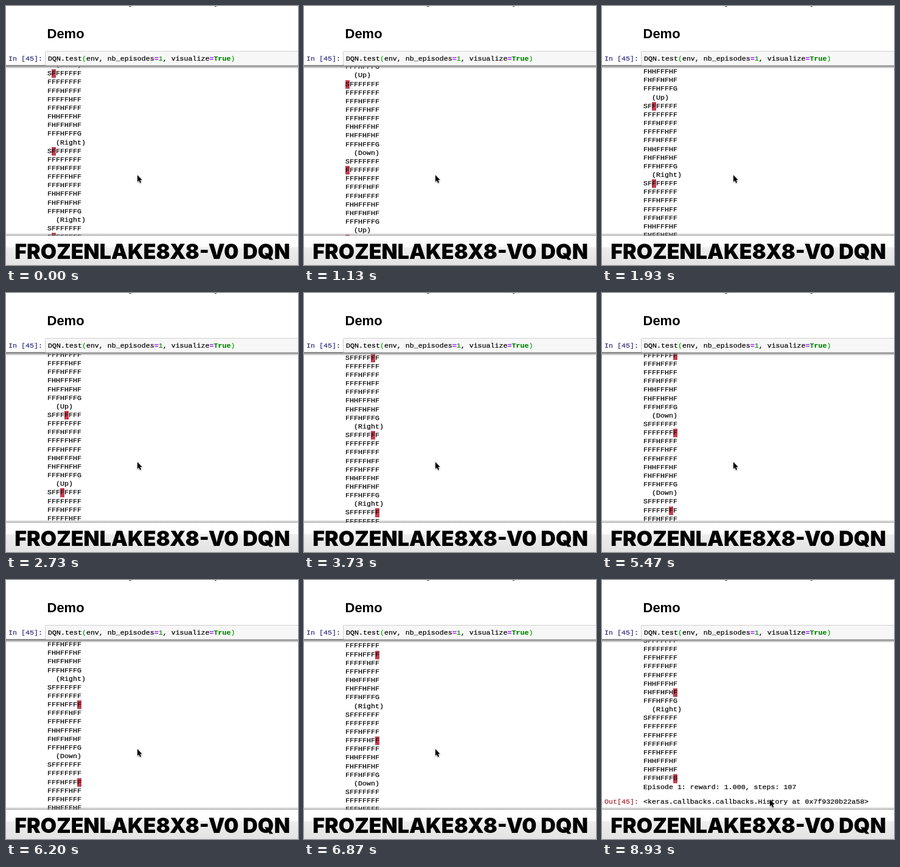
Animation, 480 px wide and 426 px high, one loop 8990 ms. Source, as an HTML page:

```html
<!DOCTYPE html>
<html lang="en">
<head>
<meta charset="utf-8">
<title>FrozenLake8x8-v0 DQN</title>
<style>
  html, body { margin: 0; width: 100%; height: 100%; overflow: hidden; background: #fff; }
  #stage { position: relative; width: 480px; height: 426px; overflow: hidden; background: #fff; color: #000; }
  #stage > *, .prompt { position: absolute; }
  .mono {
    font: 11.65px/14.156px "Liberation Mono", "Courier New", monospace;
    white-space: pre; -webkit-text-stroke: .2px;
  }
  .scrap { top: 0; height: 1px; background: #444; }
  h2 { left: 67.5px; top: 33px; margin: 0; font: bold 22px/26px "Liberation Sans", Arial, sans-serif; }
  #cell {
    left: 64px; top: 74px; width: 430px; height: 24px; box-sizing: border-box;
    border: 1px solid #cfcfcf; border-radius: 2px; background: #f7f7f7;
  }
  #code { left: 69px; top: 79.5px; }
  #code i { font-style: normal; color: #0a0; }
  #code u { text-decoration: none; font-weight: bold; color: #a2f; }
  #code b { color: #008000; }
  #code s { text-decoration: none; color: #080; }
  .prompt { left: 4px; }
  .in { top: 79.5px; color: #2b2b7c; }
  .out { color: #a3202c; }
  #view { left: 0; top: 98px; width: 480px; height: 280px; overflow: hidden; }
  #log { position: absolute; left: 0; top: -7.9px; width: 480px; }
  #steps, #result span + span { padding-left: 68px; }
  #steps mark {
    display: inline-block; height: 14.156px; vertical-align: top;
    background: #c23f50; color: #2a0508;
  }
  #result { margin-top: 10.6px; }
  .edge { left: 0; width: 480px; }
  #upper { top: 97px; height: 6px; background: linear-gradient(#8a8a8a, #8f8f8f 30%, #8880 100%); }
  #lower { top: 373px; height: 5px; background: linear-gradient(#8880, #888a); }
  #banner {
    left: 0; top: 378px; width: 480px; height: 48px;
    background: linear-gradient(#fff 0, #fdfdfd 36%, #ededed 42%, #e3e3e3);
  }
  #title {
    left: -20px; top: 381px; width: 521px; text-align: center; white-space: nowrap;
    font: 900 34px/45px Inter, Roboto, sans-serif;
  }
  #cursor { left: 0; top: 0; overflow: visible; filter: drop-shadow(0 1px 1px #0006); }
</style>
</head>
<body>
<div id="stage">
  <div class="scrap" style="left:202px;width:4px"></div>
  <div class="scrap" style="left:343px;width:3px"></div>
  <h2>Demo</h2>
  <div id="view">
    <div id="log" class="mono"><div id="steps"></div><div id="result"><span class="prompt out">Out[45]:</span><span>&lt;keras.callbacks.callbacks.History at 0x7f9320b22a58&gt;</span></div></div>
  </div>
  <div id="upper" class="edge"></div>
  <div id="lower" class="edge"></div>
  <div id="cell"></div>
  <div class="prompt in mono">In [45]:</div>
  <div id="code" class="mono">DQN.test<i>(</i>env, nb_episodes<u>=</u><s>1</s>, visualize<u>=</u><b>True</b><i>)</i></div>
  <svg id="cursor" width="10" height="16">
    <path d="M0 0V11L2.5 8.9 4.3 13 6.1 12.2 4.4 8.2 7.6 8Z" fill="#000" stroke="#fff" stroke-width=".9" paint-order="stroke"/>
  </svg>
  <div id="banner"></div>
  <div id="title">FROZENLAKE8X8-V0 DQN</div>
</div>
<script>
const LOOP = 8990, TICK = 1000 / 15, BLOCK = 14.156 * 9;
const $ = id => document.getElementById(id);

const lake = ["SFFFFFFF", "FFFFFFFF", "FFFHFFFF", "FFFFFHFF",
              "FFFHFFFF", "FHHFFFHF", "FHFFHFHF", "FFFHFFFG"];
const names = { U: "Up", D: "Down", L: "Left", R: "Right" };
const delta = { u: [-1, 0], d: [1, 0], l: [0, -1], r: [0, 1], ".": [0, 0] };

// Chosen action and actual slide on the ice, one letter per step
const actions = "DRRULDUDUDURUDRRURRURURUUURRURRRRRRR" +
                "RURRDRURRURDRDRDDRURDRRDRDRRRRDRDR";
const slides = "..dul.du.du.dru.r.r.dr.u.l.r.r..r..r" +
               "..l.r.d.u.lrd...l.ur.dd.u..d.ddddd";

function renderSteps() {
  let row = 0, col = 1;
  const lines = [];
  [...actions].forEach((action, i) => {
    const [dy, dx] = delta[slides[i]];
    row += dy;
    col += dx;
    lines.push(`  (${names[action]})`);
    lake.forEach((text, r) => lines.push(r !== row ? text :
      `${text.slice(0, col)}<mark>${text[col]}</mark>${text.slice(col + 1)}`));
  });
  lines.push("Episode 1: reward: 1.000, steps: 107");
  $("steps").innerHTML = lines.join("\n");
}

// Key points: [tick, value, ...]
const scroll = [[4, 0], [17, 7.864], [41, 23.296], [56, 33.037],
                [82, 50.177], [103, 64.131], [109, 68.088]];
const pointer = [[111, 216, 278], [113, 212, 318], [115, 212, 318],
                 [129, 181, 360], [132, 235, 363], [134, 276, 361]];

function along(points, tick) {
  const next = points.findIndex(p => p[0] > tick);
  if (next === 0) return points[0].slice(1);
  if (next < 0) return points[points.length - 1].slice(1);
  const a = points[next - 1], b = points[next];
  const k = (tick - a[0]) / (b[0] - a[0]);
  return a.slice(1).map((v, i) => v + (b[i + 1] - v) * k);
}

function draw(time) {
  const tick = Math.floor((time % LOOP + 5) / TICK);
  const [blocks] = along(scroll, tick);
  const [x, y] = along(pointer, tick);
  $("log").style.transform = `translateY(${-blocks * BLOCK}px)`;
  $("cursor").style.transform = `translate(${x}px, ${y}px)`;
}

renderSteps();
const start = performance.now();
function loop() {
  draw(performance.now() - start);
  requestAnimationFrame(loop);
}
loop();
</script>
</body>
</html>
```
